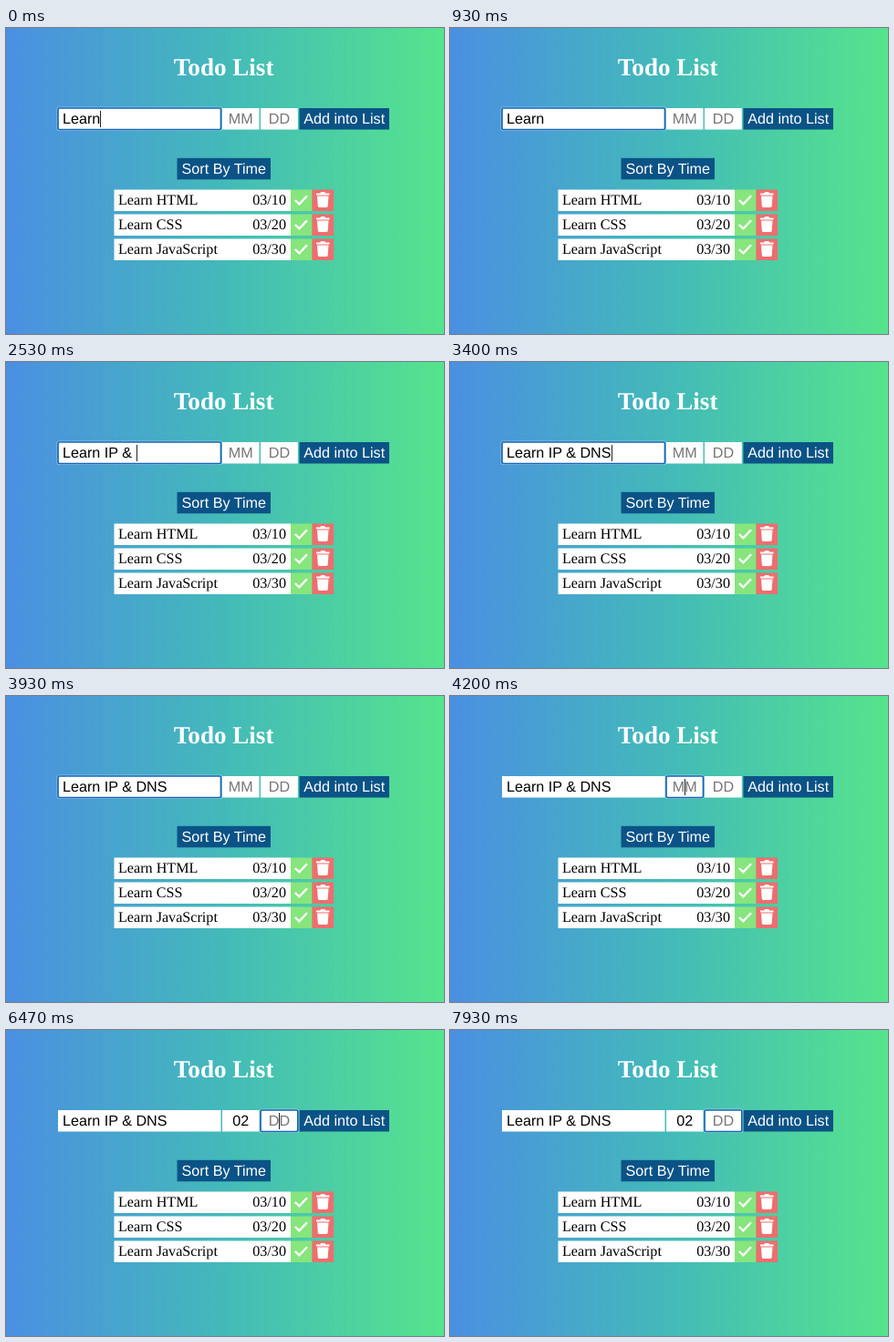
Recreate the animation shown at these times as an HTML page. Size 480x336 px, loop 8 s.

```html
<!DOCTYPE html>
<html lang="en">
<head>
<meta charset="utf-8">
<title>Todo List</title>
<style>
  html, body { margin: 0; width: 100%; height: 100%; overflow: hidden; }
  svg { display: block; width: 480px; height: 336px; }
  text { white-space: pre; text-rendering: geometricPrecision; }
  .sans { font: 16.15px "Liberation Sans", Arial, sans-serif; }
  .serif { font: 16.15px "Liberation Serif", Times, serif; }
  .title { font: bold 27.1px "Liberation Serif", Times, serif; }
</style>
</head>
<body>
<svg id="stage" viewBox="0 0 480 336">
  <defs>
    <linearGradient id="sky">
      <stop offset="0" stop-color="#4b8fe2"/>
      <stop offset=".5" stop-color="#43bab9"/>
      <stop offset="1" stop-color="#56e48c"/>
    </linearGradient>
  </defs>
  <rect width="480" height="336" fill="url(#sky)"/>
</svg>
<script>
const LOOP = 8000, STEP = 1000 / 15, BLINK = 490;
const stage = document.getElementById('stage');

function add(tag, attrs, text) {
  const node = document.createElementNS('http://www.w3.org/2000/svg', tag);
  for (const key in attrs) node.setAttribute(key, attrs[key]);
  if (text) node.textContent = text;
  return stage.appendChild(node);
}
const box = (x, y, width, height, fill) => add('rect', { x, y, width, height, fill });
const label = (x, y, text, style, fill, anchor = 'start') =>
  add('text', { x, y, class: style, fill, 'text-anchor': anchor }, text);

const pen = document.createElement('canvas').getContext('2d');
pen.font = '16.15px "Liberation Sans", Arial, sans-serif';
const widthOf = text => pen.measureText(text).width;

function button(x, y, width, text) {
  box(x, y, width, 23.5, '#0b5386');
  label(x + width / 2, y + 17.2, text, 'sans', '#fff', 'middle');
}

function todo(y, name, date) {
  box(118.5, y, 193.5, 23.5, '#fff');
  label(123, y + 16.7, name, 'serif', '#000');
  label(307, y + 16.7, date, 'serif', '#000', 'end');
  box(312, y, 23.5, 23.5, '#86e57d');
  box(335.5, y, 23.5, 23.5, '#f06d6e');
  add('path', {
    d: `M316.8 ${y + 11.5}l4.6 4.4 8.6-9.2`,
    fill: 'none', stroke: '#fff', 'stroke-width': 2.4
  });
  add('path', {
    d: `M340 ${y + 4}h4.2l1-1.5h4l1 1.5h4.3v2h-14.5z` +
       `M341 ${y + 7}h12.5l-.8 11q-.2 1.6-1.8 1.6h-7.3q-1.6 0-1.8-1.6z`,
    fill: '#fff'
  });
}

label(238.6, 52, 'Todo List', 'title', '#fff', 'middle');
button(321.5, 88, 98.5, 'Add into List');
button(187.5, 142.8, 102.5, 'Sort By Time');
todo(177.5, 'Learn HTML', '03/10');
todo(204.5, 'Learn CSS', '03/20');
todo(231.5, 'Learn JavaScript', '03/30');

const fields = [
  { x: 57, width: 178.5, hint: '' },
  { x: 237, width: 40.5, hint: 'MM', centred: true },
  { x: 279, width: 40.8, hint: 'DD', centred: true }
];
for (const f of fields) {
  box(f.x, 88, f.width, 23.5, '#fff');
  f.textX = f.centred ? f.x + f.width / 2 : 62;
  f.node = label(f.textX, 105.3, '', 'sans', '#000', f.centred ? 'middle' : 'start');
}

const ring = (stroke, width, opacity) => add('rect', {
  y: 88, height: 23.5, rx: 1.5, fill: 'none', stroke, 'stroke-width': width, opacity
});
const halo = ring('#d5e6f8', 3.2, 0.5);
const focusRing = ring('#1765b8', 1.7, 1);
stage.insertBefore(halo, fields[0].node.previousSibling);
const caret = box(0, 91, 1, 18, '#222');

// Time, focused field, its content
const events = [
  [0, 0, 'Learn'], [66, 0, 'Learn '],
  [1400, 0, 'Learn I'], [1530, 0, 'Learn IP'],
  [1860, 0, 'Learn IP '], [2260, 0, 'Learn IP &'], [2530, 0, 'Learn IP & '],
  [2930, 0, 'Learn IP & D'], [3130, 0, 'Learn IP & DN'], [3400, 0, 'Learn IP & DNS'],
  [3970, 1, ''], [4660, 1, '0'], [4860, 1, '02'],
  [5430, 2, '']
];

function draw(ms) {
  const t = Math.floor((ms + 4) / STEP) * STEP;
  const values = ['', '', ''];
  let last;
  for (const event of events) {
    if (event[0] > t + 1) break;
    last = event;
    values[event[1]] = event[2];
  }
  fields.forEach((f, i) => {
    f.node.textContent = values[i] || f.hint;
    f.node.setAttribute('fill', values[i] ? '#000' : '#757575');
  });

  const [since, index, text] = last, f = fields[index];
  for (const r of [halo, focusRing]) {
    r.setAttribute('x', f.x);
    r.setAttribute('width', f.width);
  }
  const end = f.textX + widthOf(text) / (f.centred ? 2 : 1);
  caret.setAttribute('x', Math.round(end));
  const lit = Math.floor(Math.max(0, t - since) / BLINK) % 2 === 0;
  caret.setAttribute('visibility', lit ? 'visible' : 'hidden');
}

const start = performance.now();
function tick() {
  draw((performance.now() - start) % LOOP);
  requestAnimationFrame(tick);
}
tick();
</script>
</body>
</html>
```
